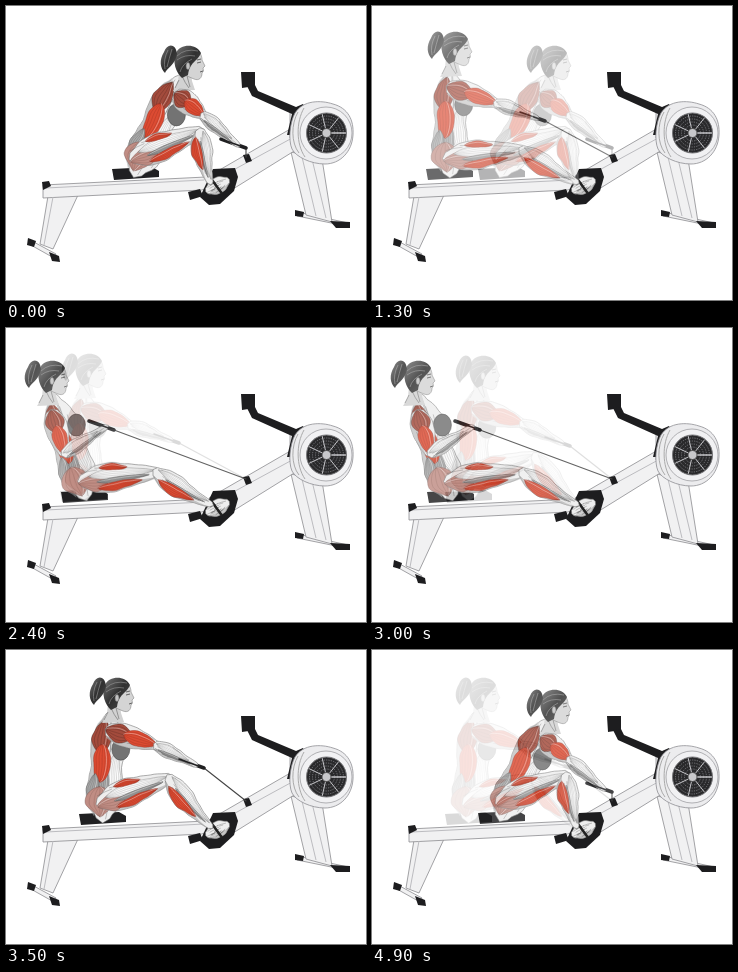
An HTML page for the animation above (5000 ms loop, 360 by 294 pixels).

```html
<!DOCTYPE html>
<html lang="en">
<head>
<meta charset="utf-8">
<title>Rowing machine</title>
<style>
html, body { margin: 0; width: 100%; height: 100%; overflow: hidden; background: #fff; }
svg { display: block; width: 100vw; height: 100vh; }
</style>
</head>
<body>
<svg id="stage" viewBox="0 0 360 294">
  <defs>
    <linearGradient id="hair" x1="0" y1="0" x2="1" y2="1">
      <stop offset="0" stop-color="#777"/><stop offset=".5" stop-color="#303030"/><stop offset="1" stop-color="#4c4c4c"/>
    </linearGradient>
    <g id="machine" stroke-linejoin="round">
      <g fill="#f1f1f2" stroke="#8c8c90" stroke-width=".8">
        <path d="M24 234L50 248L48 252L23 238Z"/>
        <path d="M42 190L72 189L47 243L34 238Z"/>
        <path d="M37 179L200 171L214 176L196 184L37 192Z"/>
        <path d="M292 206L342 217L340 220L291 210Z"/>
        <path d="M285 146L316 153L326 216L300 209Z"/>
        <path d="M203 170L286 122L296 128L293 142L227 183L209 185Z"/>
        <path d="M284 104H291V132H284Z"/>
      </g>
      <path d="M47 191L38 239M40 182L198 174M296 151L310 210M306 153L320 212M209 174L288 131" fill="none" stroke="#bcbcc0"/>
      <g fill="#1d1d1f">
        <path d="M36 176L43 175L45 180L37 184Z"/>
        <path d="M22 232L30 235L28 241L21 239Z"/>
        <path d="M43 246L53 250L54 256L46 255Z"/>
        <path d="M289 204L298 206L297 211L289 210Z"/>
        <path d="M324 215L344 216V222H330Z"/>
        <path d="M235 66H249V80L236 82Z"/>
        <path d="M241 80L249 79L252 85L290 101L297 98L299 102L288 129L281 129L286 108L246 90Z"/>
        <path d="M237 149L243 148L246 155L240 157Z"/>
        <path d="M182 186L194 183L197 190L184 194Z"/>
        <path d="M207 163L229 162L232 171L228 185L214 198L203 199L194 191Z"/>
      </g>
      <path d="M289 107C297 94 315 94 327 98C342 102 348 114 347 129C346 146 334 158 319 158C305 158 290 151 286 143C282 134 284 116 289 107Z" fill="#ececee" stroke="#8f8f93" stroke-width=".8"/>
      <path d="M292 106C285 118 285 137 293 147M298 102C290 116 290 138 299 151" fill="none" stroke="#aaa"/>
      <circle cx="320" cy="127" r="26" fill="#f1f1f3" stroke="#a0a0a4" stroke-width=".8"/>
      <g id="fan" transform="translate(320.5 127)"/>
    </g>
    <g id="head" stroke-linejoin="round">
      <path d="M-6 8L6 10L7 18L10 27L-12 28L-7 19Z" fill="#d2d2d2"/>
      <path d="M-3 13Q0 20 4 25M2 13L5 24M-6 17L-10 25" fill="none" stroke="#777" stroke-width=".7"/>
      <path d="M12-13C16-10 17-6 17-3L20 3L18 5L18.500 8L17 10C17 15 14 18 9 16L2 13L-3 6L2-8Z" fill="#d4d4d4" stroke="#858585" stroke-width=".6"/>
      <path d="M12-3L16-4M12 0L16-1M15 9L18 8" fill="none" stroke="#555" stroke-width=".9"/>
      <path d="M16-10C11-20-5-19-9-10C-13-2-9 10-3 15L3 12C4 4 7 1 10-2C13-5 15-7 16-10Z" fill="url(#hair)"/>
      <path d="M-8-9C-9-20-18-20-21-11C-26-3-25 5-20 10C-18 5-12 3-9-5Z" fill="url(#hair)"/>
      <path d="M-8-7Q0-15 13-12M-8-3Q0-9 10-7M-5 9Q-3 1 7-4M-17-13Q-22-3-20 6M-13-14Q-16-4-18 4" fill="none" stroke="#999" stroke-width=".6"/>
      <ellipse cx="3" cy="3" rx="2" ry="3.500" fill="#c2c2c2" stroke="#666" stroke-width=".6"/>
    </g>
  </defs>
</svg>
<script>
const stage = document.getElementById('stage');
const fix = n => n.toFixed(1);
const range = n => Array.from({ length: n + 1 }, (_, i) => i / n);
const poly = pts => 'M' + pts.map(p => p.map(fix)).join('L');
const line = (d, color, w, opacity = 1) =>
  `<path d="${d}" fill="none" stroke="${color}" stroke-width="${w}" stroke-linecap="round" opacity="${opacity}"/>`;

function seeded(seed) {
  return () => (seed = seed * 16807 % 2147483647) / 2147483647;
}

// A limb from a to b. at(t, s): t runs along it, s across it from -1 to 1.
function limb([ax, ay], [bx, by], widths, bend = 0) {
  const dx = bx - ax, dy = by - ay, len = Math.hypot(dx, dy);
  const halfWidth = t => {
    const x = Math.max(0, Math.min(.9999, t)) * (widths.length - 1);
    const i = Math.floor(x), ease = (1 - Math.cos((x - i) * Math.PI)) / 2;
    return widths[i] + (widths[i + 1] - widths[i]) * ease;
  };
  const at = (t, s) => {
    const off = s * halfWidth(t) + bend * 4 * t * (1 - t);
    return [ax + dx * t - dy / len * off, ay + dy * t + dx / len * off];
  };
  return { at };
}

// Spindle outline inside a limb; power sets how blunt its ends are
function spindle({ at }, t0, t1, mid, half, power) {
  const side = k => range(24).map(u =>
    at(t0 + (t1 - t0) * u, mid + k * half * Math.max(0, Math.sin(Math.PI * u)) ** power));
  return { side, d: poly([...side(1), ...side(-1).reverse()]) + 'Z' };
}

const TONES = {
  red: ['#dc4b32', '#84281c'],
  dark: ['#a34b3c', '#3c1d19'],
  rose: ['#c08d84', '#77504a'],
  pale: ['#fafafa', '#777'],
  grey: ['#a9a9a9', '#4c4c4c']
};

function muscle(part, tone, t0, t1, mid, half) {
  const [fill, dark] = TONES[tone];
  const { side, d } = spindle(part, t0, t1, mid, half, .6);
  const fibres = [-.7, -.35, 0, .35, .7].map(k => poly(side(k))).join('');
  return `<path d="${d}" fill="${fill}" stroke="${dark}" stroke-width=".4"/>` +
    line(fibres, dark, .5, .5) + line(poly(side(-.5)), '#fff', .8, .45);
}

// Limb surface: light skin, shaded lower edge, random fibres
function skin(part, seed) {
  const rnd = seeded(seed);
  const outline = spindle(part, -.06, 1.06, 0, 1, .28).d;
  const shade = spindle(part, 0, 1, .74, .24, .4).d;
  const fibres = range(21).map(() => {
    const t = rnd() * .7, s = rnd() * 1.6 - .8, span = .12 + rnd() * .25;
    return poly([0, .5, 1].map(u => part.at(t + span * u, s * (1 - u * .2))));
  }).join('');
  return `<path d="${outline}" fill="#eee" stroke="#777" stroke-width=".6"/>` +
    `<path d="${shade}" fill="#aaa" opacity=".6"/>` + line(fibres, '#444', .6, .5);
}

const muscles = (part, list) => list.map(m => muscle(part, ...m)).join('');

const ANKLE = [204, 176], GUIDE = [240, 151];
const FOOT = limb([201, 185], [222, 174], [5, 8, 8, 5]);
const POSES = [
  { head: [179, 57], shoulder: [170, 88], elbow: [197, 109], hand: [232, 139], hip: [127, 152], knee: [194, 125] },
  { head: [80, 43], shoulder: [77, 81], elbow: [124, 97], hand: [165, 112], hip: [75, 152], knee: [150, 144] },
  { head: [43, 50], shoulder: [46, 84], elbow: [58, 126], hand: [100, 99], hip: [76, 153], knee: [150, 144] },
  { head: [108, 45], shoulder: [102, 80], elbow: [150, 95], hand: [190, 115], hip: [94, 153], knee: [163, 128] }
];

function scene({ head, shoulder, elbow, hand, hip, knee }) {
  const shift = ([x, y], dx, dy) => [x + dx, y + dy];
  const torso = limb(shift(shoulder, 2, -14), shift(hip, 3, 14), [8, 15, 18, 17, 15, 17, 20, 20, 12]);
  const thigh = limb(hip, knee, [10, 15, 15, 12, 10, 8]);
  const shin = limb(knee, ANKLE, [8, 11, 11, 8, 6, 5], 2);
  const upper = limb(shoulder, elbow, [10, 12, 11, 9, 7]);
  const fore = limb(elbow, hand, [7, 8, 6, 4, 4]);
  const [sx, sy] = shift(hip, -21, 9);
  const [bx, by] = torso.at(.32, -.75);
  const grip = shift(hand, 8, 3);
  const handle = poly([shift(hand, -17, -6), grip]);

  const body =
    skin(torso, 11) + muscles(torso, [
      ['pale', .36, .8, -.5, .4], ['grey', .5, .82, .1, .3], ['dark', .04, .38, .4, .55],
      ['red', .28, .66, .3, .55], ['grey', .58, .84, .65, .3], ['rose', .7, 1, .25, .7]
    ]) +
    `<ellipse cx="${fix(bx)}" cy="${fix(by)}" rx="9" ry="11" fill="#737373" stroke="#4c4c4c" stroke-width=".6"/>` +
    `<use href="#head" x="${head[0]}" y="${head[1]}"/>`;
  const leg =
    skin(FOOT, 5) + line(poly([FOOT.at(.4, -1), FOOT.at(.5, 1)]), '#222', 2.5) +
    skin(thigh, 23) + muscles(thigh, [
      ['rose', -.05, .35, .25, .6], ['pale', .1, .98, -.25, .4], ['red', .25, .62, -.72, .22],
      ['grey', .2, .9, .2, .2], ['red', .2, .8, .62, .3]
    ]) +
    skin(shin, 37) + muscles(shin, [
      ['pale', .02, .95, -.4, .4], ['grey', .2, .9, .05, .18], ['red', .1, .74, .5, .48]
    ]);
  const arm =
    skin(upper, 41) + muscles(upper, [['dark', -.05, .5, 0, .8], ['red', .32, 1.02, -.05, .75]]) +
    skin(fore, 53) + muscles(fore, [['pale', 0, .8, -.2, .5], ['grey', .1, .85, .45, .25]]);

  const g = document.createElementNS('http://www.w3.org/2000/svg', 'g');
  g.innerHTML = '<rect width="360" height="294" fill="#fff"/><use href="#machine"/>' +
    line(poly([grip, GUIDE]), '#444', 1.1) +
    `<path d="M${sx} ${sy + 2}l40-2l7 4v6l-45 3Z" fill="#202022"/>` +
    body + leg + line(handle, '#202022', 3.6) + arm + line(handle, '#202022', 1.6);
  stage.append(g);
  return g;
}

function drawFan() {
  const ring = r => `<circle r="${r}" fill="none" stroke="#8a8a8e" stroke-width=".8" stroke-dasharray="1.2 1.2"/>`;
  const spokes = range(7).map(u => {
    const a = u * Math.PI * 2;
    return poly([[5 * Math.cos(a), 5 * Math.sin(a)], [19 * Math.cos(a), 19 * Math.sin(a)]]);
  }).join('');
  document.getElementById('fan').innerHTML =
    '<circle r="20" fill="#29292b" stroke="#77777a"/>' + [8, 11, 14, 17].map(ring).join('') +
    line(spokes, '#c4c4c8', 1) + '<circle r="4.500" fill="#c8c8cb" stroke="#444" stroke-width=".8"/>';
}

drawFan();
const scenes = POSES.map(scene);
const FADES = [1000, 2000, 3000, 4500];
const LOOP = 5000, STEP = 100, STEPS = 6;

function render(time) {
  const pose = Math.max(0, FADES.filter(start => time >= start).length - 1);
  const step = Math.floor((time - FADES[pose]) / STEP) + 1;
  const mix = Math.max(0, Math.min(1, step / STEPS));
  const next = (pose + 1) % scenes.length;
  scenes.forEach((g, i) => {
    g.style.display = i === pose || i === next ? '' : 'none';
    g.style.opacity = i === next ? mix : 1;
  });
  if (stage.lastChild !== scenes[next]) stage.append(scenes[next]);
}

const begin = performance.now();
function tick() {
  render((performance.now() - begin) % LOOP);
  requestAnimationFrame(tick);
}
tick();
</script>
</body>
</html>
```
